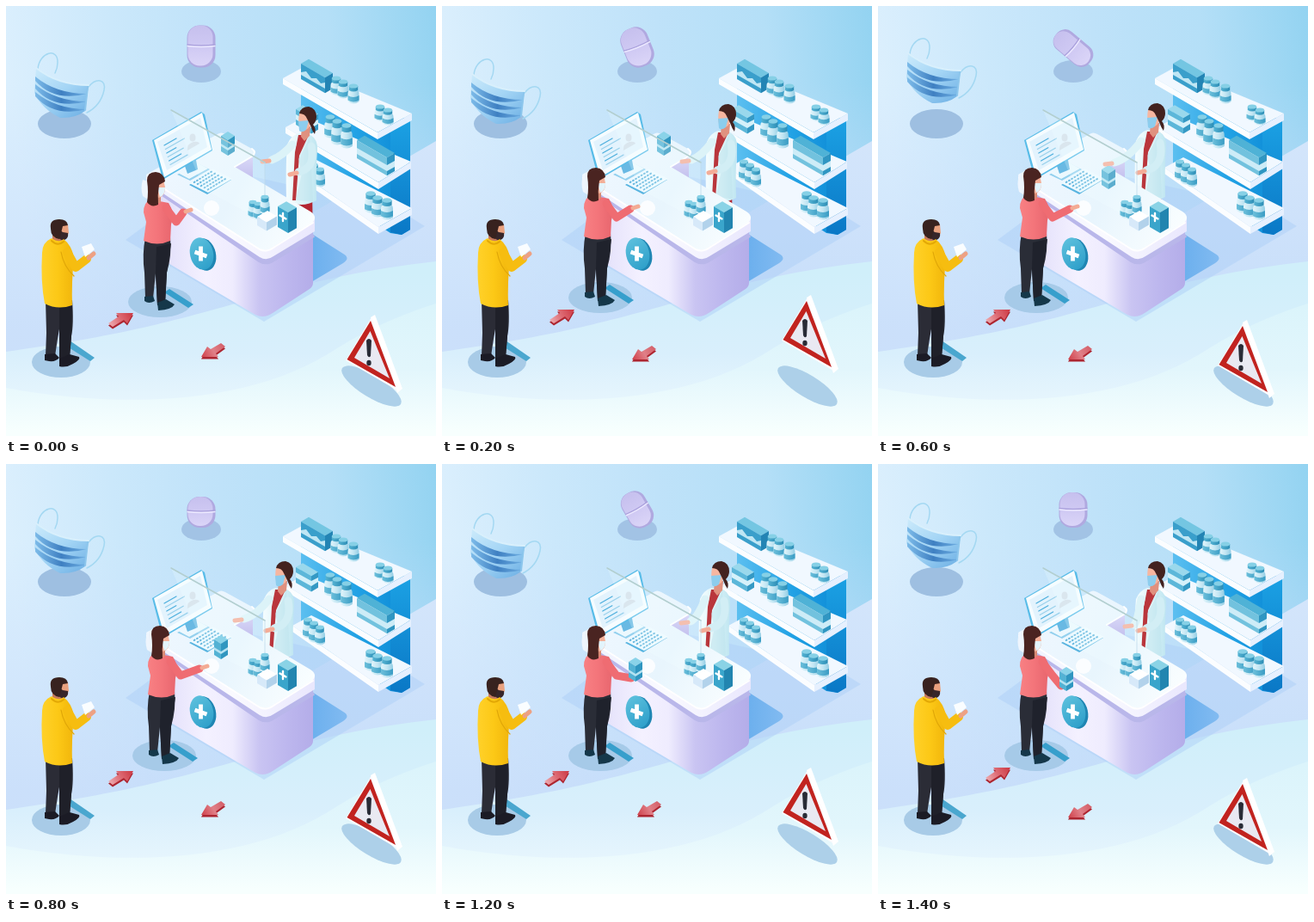
An HTML page with a canvas for the animation above (1600 ms loop, 500 by 500 pixels).

```html
<!DOCTYPE html>
<html lang="en">
<head>
<meta charset="utf-8">
<title>Pharmacy counter</title>
<style>
html, body { margin: 0; width: 100%; height: 100%; overflow: hidden; background: #d3eafb; }
canvas { display: block; width: 100vw; height: 100vh; }
</style>
</head>
<body>
<canvas id="stage" width="500" height="500"></canvas>
<script>
const c = document.getElementById('stage').getContext('2d');
const STEP = 200, STEPS = 8;

// One pose per step
const doctorAt = [[27, 4], [8, 1]];
const doctorHand = [[300, 180], [281, 180], [260, 161], [266, 183], [268, 181], [271, 179], [280, 184], [289, 188]];
const buyerHand = [[212, 239], [225, 235], [217, 236], [229, 235], [231, 237], [231, 239], [226, 248], [219, 257]];
const packAt = [[258, 161], [258, 161], [258, 161], [268, 200], [250, 214], [230, 230], [225, 240], [219, 251]];
const maskY = [0, 7, 3, -17, -3, 6, 3, -9];
const signY = [0, -23, -3, 6, 0, -20, -6, 6];
// y, width, height, degrees
const pillPose = [[47, 33, 49, 0], [48, 33, 47, -22], [44.5, 25, 49, 0], [49, 27, 51, -50],
  [56, 33, 36, 0], [54, 20, 50, -61], [53, 30, 44, -30], [53.5, 33, 41, 0]];

function fill(d, color) {
  c.fillStyle = color;
  c.fill(new Path2D(d));
}
function line(d, color, width = 1, cap = 'round') {
  c.strokeStyle = color;
  c.lineWidth = width;
  c.lineCap = cap;
  c.lineJoin = 'round';
  c.stroke(new Path2D(d));
}
function oval(x, y, rx, ry, color, turn = 0) {
  c.fillStyle = color;
  c.beginPath();
  c.ellipse(x, y, rx, ry, turn, 0, Math.PI * 2);
  c.fill();
}
function grad(x0, y0, x1, y1, ...colors) {
  const g = c.createLinearGradient(x0, y0, x1, y1);
  colors.forEach((k, i) => g.addColorStop(i / (colors.length - 1), k));
  return g;
}
function at(x, y, draw) {
  c.save();
  c.translate(x, y);
  draw();
  c.restore();
}

// Isometric box: (x, y) is the left top corner, a and b the edge lengths in x
function box(x, y, a, b, h, top, left, right) {
  const s = 0.58, mx = x + a, my = y + a * s, rx = mx + b, ry = my - b * s;
  fill(`M${x} ${y}L${mx} ${my}L${rx} ${ry}L${x + b} ${y - b * s}Z`, top);
  fill(`M${x} ${y}L${mx} ${my}v${h}L${x} ${y + h}Z`, left);
  fill(`M${mx} ${my}L${rx} ${ry}v${h}L${mx} ${my + h}Z`, right);
}
function bottle(x, y, r, h) {
  const neck = r * 0.8, cap = h * 0.25;
  fill(`M${x - r} ${y - h * 0.55}Q${x - r} ${y - h * 0.7} ${x - neck} ${y - h * 0.74}h${neck * 2}Q${x + r} ${y - h * 0.7} ${x + r} ${y - h * 0.55}V${y - 2}Q${x} ${y + 3} ${x - r} ${y - 2}Z`,
    grad(x - r, 0, x + r, 0, '#e2f5fb', '#c3e6f3', '#93cde4'));
  fill(`M${x - r} ${y - h * 0.45}q${r} 4 ${r * 2} 0v${h * 0.28}q${-r} 4 ${-r * 2} 0Z`, grad(x - r, 0, x + r, 0, '#6cbfdb', '#3a9cc4'));
  fill(`M${x - neck} ${y - h}h${neck * 2}v${cap}q${-neck} 3 ${-neck * 2} 0Z`, grad(x - neck, 0, x + neck, 0, '#55b3d3', '#2c8db5'));
  oval(x, y - h, neck, neck * 0.5, '#86d0e6');
}
function pack(x, y) {
  fill(`M${x - 8} ${y - 10}L${x} ${y - 15}L${x + 8} ${y - 10}L${x} ${y - 5}Z`, '#8ad3e9');
  fill(`M${x - 8} ${y - 10}L${x} ${y - 5}V${y + 13}L${x - 8} ${y + 8}Z`, '#53b2d4');
  fill(`M${x + 8} ${y - 10}L${x} ${y - 5}V${y + 13}L${x + 8} ${y + 8}Z`, '#3096c0');
  fill(`M${x - 8} ${y - 1}l8 5l8 -5v3l-8 5l-8 -5Z`, '#b5e2f1');
}

function backdrop() {
  c.fillStyle = grad(0, 60, 500, 0, '#dbeffd', '#cbe8fb', '#bfe2f9', '#b4dff7', '#93d3f1');
  c.fillRect(0, 0, 500, 500);
  c.fillStyle = grad(0, 90, 0, 380, 'rgba(200,222,252,0)', 'rgba(199,220,250,.8)');
  c.fillRect(0, 0, 500, 500);
  fill('M500 157L300 273V360H500Z', grad(0, 160, 0, 330, '#d3e5fb', '#c9dffa'));
  fill('M0 402C120 385 175 372 270 345S420 306 500 297V500H0Z', grad(0, 310, 0, 500, '#d0effa', '#d9effc', '#f0fafe'));
  fill('M0 444C140 470 290 462 385 398C425 373 465 357 500 346V500H0Z', grad(0, 350, 0, 495, '#dbf4fb', '#e2f6fc', '#f7fffe'));
  fill('M139 272L300 367L487 256L455 236L250 190Z', 'rgba(174,207,248,.5)');
  fill('M340 255L392 288Q401 293 392 299L350 324Z', grad(350, 0, 398, 0, '#69aeed', '#82bbf1'));
}

function slab(x, y, bx, by, rx, ry) {
  fill(`M${x} ${y}L${x + 22} ${y - 12}L${rx} ${ry}L${bx} ${by}Z`, '#f1f8ff');
  fill(`M${x} ${y}L${bx} ${by}v8L${x} ${y + 7}Z`, '#fbfdff');
  fill(`M${bx} ${by}L${rx} ${ry}v8L${bx} ${by + 8}Z`, '#e6f0fe');
}
function shelves() {
  fill('M343 80L470 133V260L460 266L447 264L343 196Z', grad(343, 0, 470, 0, '#5cbff0', '#22a2e5', '#0a88d4'));
  fill('M447 145L470 133V260L460 266L447 263Z', grad(0, 135, 0, 265, '#1ba0e3', '#0a78c6'));
  slab(333, 188, 433, 257, 472, 235);
  slab(325, 141, 433, 205, 471, 181);
  slab(322, 84, 432, 147, 472, 125);
  box(343, 67, 28, 9, 18, '#74c6e2', '#3a9fcb', '#2384b4');
  fill('M343 77l6 -1l6 8l6 0l5 6l5 -1v7l-28 -16Z', '#bfe6f4');
  [[384, 103, 19], [392, 107, 19], [404, 113, 20], [435, 133, 16], [444, 138, 17]].forEach(b => bottle(b[0], b[1], 6.5, b[2]));
  box(337, 120, 18, 8, 18, '#9ad8ec', '#5cb7d9', '#3599c4');
  fill('M337 126l18 10l8 -4v5l-8 5l-18 -10Z', '#d5f1fa');
  [[377, 153, 24], [385, 161, 27], [396, 165, 26]].forEach(b => bottle(b[0], b[1], 6.8, b[2]));
  box(408, 156, 35, 9, 21, '#4fb2d6', '#72c2de', '#3096c2');
  fill('M408 165l35 20l9 -5v7l-9 5l-35 -20Z', '#cdecf7');
  [[351, 202, 21], [358, 207, 22], [365, 210, 20]].forEach(b => bottle(b[0], b[1], 6, b[2]));
  [[424, 240, 22], [432, 245, 22], [443, 248, 22]].forEach(b => bottle(b[0], b[1], 7, b[2]));
}

function doctorHead() {
  fill('M314 132h10l-1 11l-6 6l-4 -5Z', '#e0917f');
  fill('M311 117Q309 127 312 135Q320 139 324 130L322 115Z', '#f6b6a0');
  fill('M310 126L322 125L319 136Q314 140 311 137Z', '#8ccdee');
  fill('M311 117Q313 109 322 109Q331 111 331 121Q331 126 327 130Q331 134 329 141Q326 137 324 131L320 123Q318 117 311 117Z', '#43221f');
}
function doctor(k) {
  const [dx, dy] = doctorAt[k] || [0, 0];
  at(dx, dy, () => {
    fill('M302 205H329L330 279L324 281L321 235L310 240Z', '#b32632');
    line('M327 258V278', '#2e2433', 3);
    fill('M313 144Q304 147 300 157Q298 180 299 222Q316 232 334 222Q333 190 335 164Q336 151 327 146Z', grad(300, 0, 336, 0, '#f3fcfe', '#def4f9', '#bde5f0'));
    fill('M313 146L325 146L314 170L310 222L306 222L309 166Z', '#b9363c');
    fill('M326 147L322 158L313 174L317 190L310 222L330 223Q328 180 326 147Z', 'rgba(190,228,238,.5)');
    at(3, 4, doctorHead);
  });
}
function doctorArms(k) {
  const [dx, dy] = doctorAt[k] || [0, 0], [hx, hy] = doctorHand[k];
  const sx = 306 + dx, sy = 157 + dy, ex = (sx + hx) / 2 + 4, ey = Math.max(sy, hy) - (k === 2 ? 0 : 5);
  line(`M${sx} ${sy}Q${ex} ${ey} ${hx + 9} ${hy - 1}`, '#dcf3f8', 9);
  line(`M${hx + 6} ${hy}L${hx - 2} ${hy + 1}`, '#f4ad98', 5);
  const nx = 305 + (k ? dx : 28), ny = 192 + (k ? 0 : 2);
  line(`M${328 + dx} ${159 + dy}Q${332 + dx} ${179 + dy} ${nx + 15} ${ny - 4}L${nx + 7} ${ny - 1}`, '#d2eef5', 9);
  line(`M${nx + 5} ${ny}L${nx - 3} ${ny + 2}`, '#f4ad98', 5);
}

function counter() {
  fill('M262 186L287 170V202L300 215Z', grad(0, 170, 0, 205, '#d9d4f8', '#b1a9e6'));
  fill('M170 206L300 280L357 256V322Q357 326 353 329L310 357Q300 364 290 359L170 288Z',
    grad(170, 0, 357, 0, '#dcd9f8', '#e9e6fc', '#f4f1ff', '#efecfe', '#c9c4f2', '#bdb7ee', '#b4ade9'));
  line('M172 210L295 294Q303 299 311 293L357 265', '#b9b7ea', 8, 'butt');
  fill('M163 197V205L295 292Q303 297 311 291L359 262V246Z', grad(163, 0, 360, 0, '#eef1ff', '#fafaff', '#e9e7fd'));
  fill('M163 196L246 149Q250 146 255 149L286 166Q293 170 286 175L266 187L354 239Q363 245 356 252L311 280Q303 286 295 282L164 199Z', grad(180, 170, 350, 270, '#eff7ff', '#e8f5fd', '#fafeff'));
  line('M164 200L295 283Q303 287 311 281L357 252', '#fff', 2);
  line('M266 187L286 175Q292 170 286 166', '#fff', 2);
}

function monitor() {
  fill('M199 196L223 183L237 190L214 203Z', '#93d0ee');
  fill('M200 194L222 182L235 189L213 201Z', '#ecf8fe');
  fill('M206 180L220 174L223 190L211 195Z', '#69b9e3');
  fill('M170 156L227 123L231 126L240 168L184 201L181 198Z', '#58bce8');
  fill('M172 156L228 124L239 167L184 199Z', '#f6fcff');
  fill('M176 158L226 130L234 164L187 191Z', '#e3f3fd');
  for (let i = 0; i < 6; i++) {
    const x = 184 + i * 1.4, y = 162 + i * 4.5, w = [14, 22, 11, 18, 14, 20][i];
    line(`M${x} ${y}l${w} ${-w * 0.57}`, i % 2 ? '#9ad1ec' : '#4fb0de', 1.3);
  }
  oval(217, 153, 3.5, 4.5, '#d3dfe9');
  fill('M211 168Q210 160 218 158Q224 157 225 160Z', '#d3dfe9');
  fill('M213 208L240 191L262 202L234 219Z', '#58b4e0');
  fill('M213 206L240 189L263 201L235 217Z', '#eef9ff');
  c.setLineDash([2.6, 1.2]);
  for (let i = 0; i < 5; i++) {
    line(`M${218 + i * 4} ${205.5 + i * 2.1}l22 -13.5`, '#5fb4dd', 1.8, 'butt');
  }
  c.setLineDash([]);
}

function goods() {
  fill('M192 121L301 182V251L230 213Z', 'rgba(240,255,253,.22)');
  oval(239, 235, 9, 9, 'rgba(255,255,255,.8)');
  line('M192 121L301 182', '#b3cfd0', 1.6);
  line('M301 182V248', 'rgba(190,219,235,.8)');
  [[287, 246, 18], [293, 248, 18], [301, 242, 20]].forEach(b => bottle(b[0], b[1], 5.5, b[2]));
  box(292, 245, 11, 12, 10, '#fff', '#d7e9f9', '#b2d2eb');
  box(316, 233, 12, 10, 24, '#8ad3e6', '#3aa5cb', '#2285b0');
  line('M322 241v9M318.5 243.5l7 4', '#fff', 2.4);
  oval(231, 289, 13, 19, '#1f86b3', -0.22);
  oval(227.5, 288, 13.5, 19, grad(215, 270, 240, 305, '#5fc2de', '#2c9ec9'), -0.22);
  line('M226.5 279.5v17M219.5 286l14 5', '#fff', 4.8, 'butt');
}

function man() {
  oval(64, 414, 34, 18, '#a8cbe7');
  fill('M74 389L103 409L98 413L68 394Z', '#4aa7cf');
  fill('M46 342H77Q79 370 76 384L74 408L63 411L63 370L60 387L57 407L46 407L47 380Z', '#2b2c36');
  fill('M62 350L62 411L74 408L76 384L77 346Z', '#1f2029');
  fill('M45 405L57 404L62 409Q58 414 50 413L45 412Z', '#1b1b25');
  fill('M62 410L74 405L85 408Q87 411 78 416Q70 421 62 419Z', '#1b1b25');
  fill('M54 264h13v15h-13Z', '#c77b5d');
  fill('M60 254H72L73 264Q71 269 65 270Z', '#e9a17f');
  fill('M62 260L66 263L72 264Q73 270 68 272Q61 273 60 266Z', '#37262a');
  fill('M52 259Q50 248 62 248Q71 248 72 255L66 256L64 264L62 271Q52 269 52 259Z', '#38221f');
  fill('M53 270Q42 275 42 287Q40 320 45 346Q60 354 77 348Q76 322 79 292Q76 278 67 271Q62 276 53 270Z', grad(42, 0, 79, 0, '#ffd129', '#fcc816', '#f1b50b'));
  line('M71 286L81 304L94 294', '#f6bd10', 10);
  line('M64 286Q67 303 79 314', '#dfa608', 1.2);
  line('M53 273Q60 280 67 274', '#e3a805', 2);
  fill('M88 280L99 276L103 283L92 292Z', '#fafdff');
  line('M96 293L102 288', '#eda183', 5);
}

function buyer(k) {
  const dx = k ? 0 : -5, dy = k ? 0 : 5, [hx, hy] = buyerHand[k];
  at(dx, dy, () => {
    oval(184, 339, 37, 18, '#a6cae8');
    fill('M195 324L223 342L217 346L189 328Z', '#379fcc');
    fill('M167 264H196Q198 285 192 305L190 341L181 343L179 306L176 335L167 335L166 305Q163 284 167 264Z', '#2a2d37');
    fill('M180 275L179 306L181 343L190 341L192 305L197 271Z', '#1f222c');
    fill('M166 333L176 332L178 338Q171 342 166 338Z', '#15384a');
    fill('M181 340L191 336L201 342Q198 348 182 349Z', '#15384a');
    fill('M164 197Q161 207 164 216L170 220V199Z', '#eef5fd');
    fill('M173 220Q165 223 165 235L168 246L165 268Q181 275 196 268L197 249Q202 236 194 224Z', grad(165, 0, 199, 0, '#f88083', '#f3747a', '#e7656d'));
    fill('M176 210h9v14h-9Z', '#d98a75');
    fill('M176 196h12l2 10q0 10 -7 12l-7 -3Z', '#f3b099');
    fill('M181 206L190 206Q190 215 184 217Z', '#e3f4fc');
    fill('M169 198Q169 188 179 188Q189 189 190 199L183 203Q181 215 182 226Q174 230 169 223Q171 212 169 198Z', '#4a2421');
  });
  const ex = 203 + dx, ey = 246 + dy;
  line(`M${191 + dx} ${230 + dy}L${ex} ${ey}L${hx - 6} ${hy + 1}`, '#ef6c72', 9);
  line(`M${hx - 3} ${hy}L${hx + 3} ${hy - 2}`, '#f3ab94', 5);
}

function mask(dy) {
  oval(68, 137, 31, 17, '#9ebfe1');
  at(0, dy, () => {
    line('M37 73C39 53 61 48 60 66Q60 72 57 78', '#a4d8f2', 1.5);
    line('M96 94C105 83 117 85 114 98Q110 116 94 124', '#a4d8f2', 1.5);
    fill('M35 72Q60 92 96 92L92 122Q80 131 63 130Q42 120 33 101Z', grad(35, 75, 80, 135, '#c9e9fb', '#a4d5f5', '#72b3e6'));
    for (let i = 0; i < 3; i++) {
      const y = 82 + i * 9;
      fill(`M34 ${y}Q58 ${y + 20} 94 ${y + 20}Q56 ${y + 30} 34 ${y + 5}Z`, grad(34, 0, 95, 0, '#7dbbe9', '#3f80c2', '#70b0e3'));
    }
    line('M35 72Q60 92 96 92', '#d9f0fc', 1.8);
    line('M95 94L92 121', '#8cc6ec', 2);
  });
}

function pill([y, w, h, deg]) {
  oval(227, 76, 23, 13, '#a2c3e5');
  at(227, y, () => {
    c.rotate(deg * Math.PI / 180);
    c.beginPath();
    c.roundRect(-w / 2, -h / 2, w, h, w * 0.44);
    c.fillStyle = '#b0a9e0';
    c.fill();
    c.clip();
    c.beginPath();
    c.roundRect(-w / 2 + 1, -h / 2, w - 4, h - 2, w * 0.42);
    c.fillStyle = grad(0, -h / 2, 0, h / 2, '#c6c0ee', '#cfc9f3', '#dcd6f8');
    c.fill();
    line(`M${-w / 2} -2Q0 0 ${w / 2} -2`, '#aaa1dc', 1.3);
    line(`M${-w / 2} -0.5Q0 1.5 ${w / 2} -0.5`, '#ece9ff', 1.3);
  });
}

function sign(dy) {
  oval(425, 442, 40, 13, '#add0e9', 0.55);
  at(0, dy, () => {
    fill('M424 362L429 359L461 445L455 450Z', '#fff');
    fill('M425 362L395 412L455 447Z', '#fdfcff');
    fill('M424 366L396.5 411L453 443Z', '#c1231f');
    fill('M423.5 378L405 409L446 433Z', '#e9e9f2');
    fill('M419 389Q422 385 425 389L424 407Q422 410 420 406Z', '#292b36');
    oval(422, 415, 2.7, 3.2, '#292b36');
  });
}

function arrows(shift) {
  const up = 'M148 357L128 357L131 361L119 369L124 373L137 365L141 369Z';
  const down = 'M227 408L247 408L244 404L255 396L250 392L238 399L234 396Z';
  at(shift, -shift * 0.65, () => {
    at(0, 2.5, () => fill(up, '#ad2530'));
    fill(up, grad(119, 372, 148, 357, '#efb3b7', '#dd6a73', '#cc3742'));
  });
  at(-shift, shift * 0.5, () => {
    at(0, 2.5, () => fill(down, '#ad2530'));
    fill(down, grad(227, 408, 255, 393, '#cf3f49', '#e08088', '#d25a64'));
  });
}

function draw(k) {
  backdrop();
  shelves();
  doctor(k);
  counter();
  monitor();
  if (k < 4) pack(...packAt[k]);
  doctorArms(k);
  goods();
  man();
  if (k === 4 || k === 5) pack(...packAt[k]);
  buyer(k);
  if (k > 5) pack(...packAt[k]);
  mask(maskY[k]);
  pill(pillPose[k]);
  sign(signY[k]);
  arrows(k % 2 ? 6 : 0);
}

const start = performance.now();
let shown = -1;
function tick() {
  const k = Math.floor((performance.now() - start) / STEP) % STEPS;
  if (k !== shown) draw(shown = k);
  requestAnimationFrame(tick);
}
tick();
</script>
</body>
</html>
```
